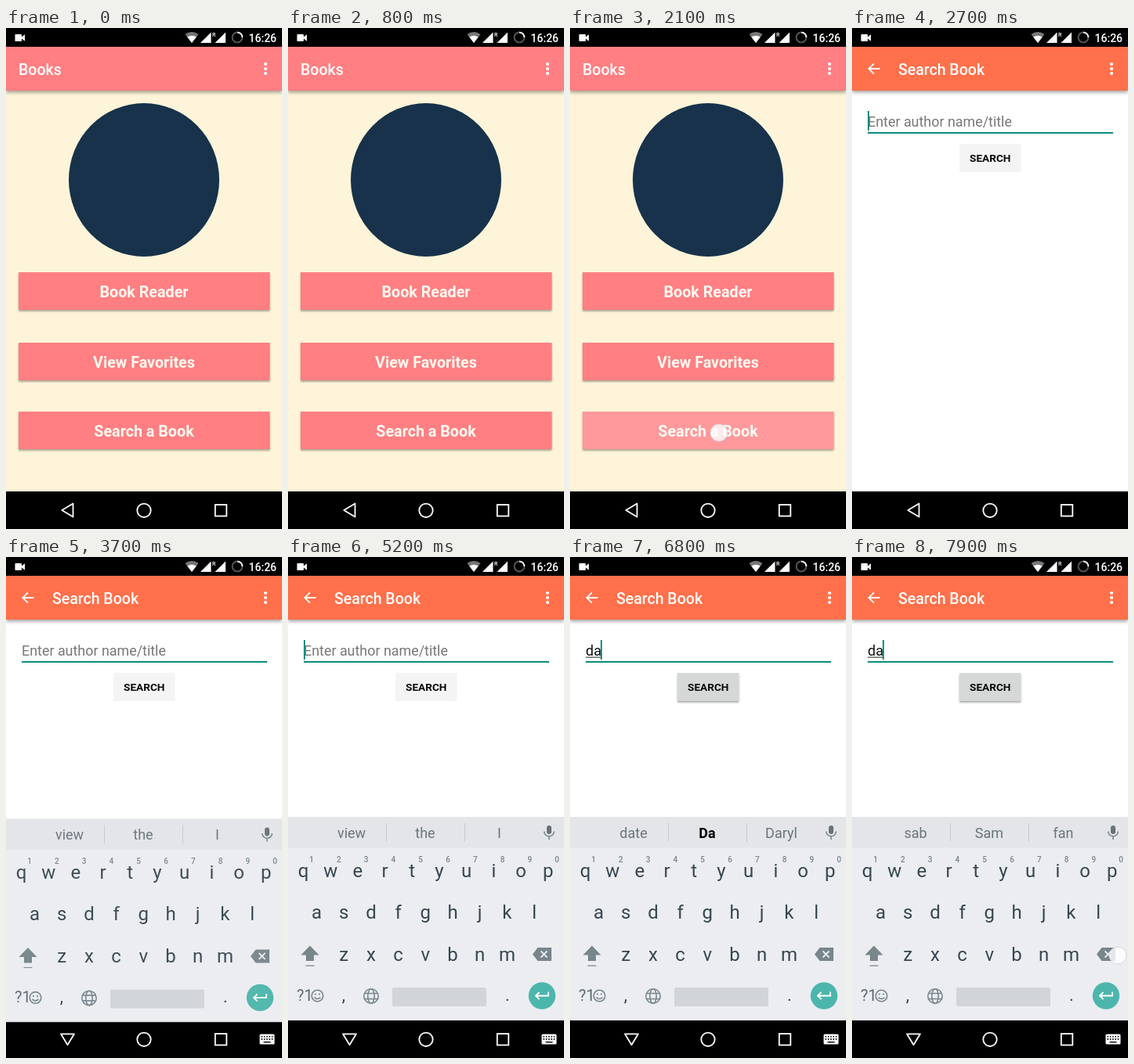
An HTML page for the animation above (8000 ms loop, 352x640 px).

```html
<!DOCTYPE html>
<html lang="en">
<head>
<meta charset="utf-8">
<title>Book search</title>
<style>
html, body { margin: 0; width: 352px; height: 640px; overflow: hidden; background: #000; }
svg { display: block; font-family: Roboto, sans-serif; }
.mid { text-anchor: middle; }
.med { font-weight: 500; }
.bold { font-weight: 700; }
.line { fill: none; stroke: #fff; stroke-width: 1.8; }
.key { font-size: 24px; fill: #37474f; text-anchor: middle; }
.digit { font-size: 10px; font-weight: 500; fill: #78868c; text-anchor: middle; }
.word { font-size: 18px; fill: #6a757b; text-anchor: middle; }
.word.bold { fill: #000; }
.glyph { fill: none; stroke: #78868c; stroke-width: 1.6; }
</style>
</head>
<body>
<svg id="stage" width="352" height="640" viewBox="0 0 352 640"></svg>
<script>
const stage = document.getElementById('stage');

const text = (x, y, size, fill, str, cls = '', extra = '') =>
  `<text x="${x}" y="${y}" font-size="${size}" fill="${fill}" class="${cls}" ${extra}>${str}</text>`;
const rect = (x, y, w, h, fill, extra = '') =>
  `<rect x="${x}" y="${y}" width="${w}" height="${h}" fill="${fill}" ${extra}/>`;
const path = (d, extra) => `<path d="${d}" ${extra}/>`;
const circle = (x, y, r, extra) => `<circle cx="${x}" cy="${y}" r="${r}" ${extra}/>`;

const toolbar = (color, title, x) =>
  rect(0, 24, 352, 56, color, 'filter="url(#barShadow)"') +
  text(x, 60, 19.5, '#fff', title, 'med') +
  [46, 52, 58].map(y => circle(331, y, 2.1, 'fill="#fff"')).join('');

const bigButton = (y, label) =>
  rect(16, y, 320.5, 48, '#ff7f82', 'filter="url(#shadow)"') +
  text(176, y + 32, 19.7, '#fffaf0', label, 'mid bold');

const keyRow = (letters, x, y) =>
  [...letters].map((c, i) => `<text class="key" x="${x + i * 34.7}" y="${y}">${c}</text>`).join('');

const books =
  rect(0, 24, 352, 568, '#fdf4d9') +
  toolbar('#ff7f82', 'Books', 16) +
  '<ellipse cx="176" cy="194" rx="96" ry="98" fill="#17324a"/>' +
  bigButton(312, 'Book Reader') + bigButton(402, 'View Favorites') + bigButton(490, 'Search a Book') +
  rect(16, 490, 320.5, 48, '#fff', 'id="press" opacity="0"');

const search =
  rect(0, 24, 352, 568, '#fff') +
  toolbar('#ff6f4b', 'Search Book', 59) +
  path('M35.5 52H21.5M28 45.3L21.3 52L28 58.7', 'class="line"') +
  text(20, 126, 17.9, '#777', 'Enter author name/title', '', 'id="hint"') +
  text(20, 126, 18, '#111', '', '', 'id="typed"') +
  rect(20, 127.6, 0, 1, '#222', 'id="under"') +
  rect(20, 133, 313, 2, '#0d8c80') +
  rect(20, 106, 2, 25, '#0d8c80', 'id="cursor"') +
  rect(137, 148, 78.5, 36, '#f4f4f4', 'id="button" rx="1"') +
  text(176.3, 171, 13.6, '#0a0a0a', 'SEARCH', 'mid bold');

const keyboard =
  rect(0, 332, 352, 40, '#e3e5e9') + rect(0, 371.5, 352, 220.5, '#ebedf1') + rect(0, 592, 352, 60, '#000') +
  [81, 175, 269.5].map(x => `<text class="word" x="${x}" y="359"></text>`).join('') +
  rect(125, 340, 1, 24, '#c6cacd') + rect(225, 340, 1, 24, '#c6cacd') +
  rect(330, 343, 6, 11, '#687278', 'rx="3"') +
  path('M326.7 350.5a6.3 6.3 0 0 0 12.6 0M333 357v4', 'class="glyph"') +
  [...'1234567890'].map((c, i) => `<text class="digit" x="${30 + i * 34.8}" y="390">${c}</text>`).join('') +
  keyRow('qwertyuiop', 19.5, 409) + keyRow('asdfghjkl', 36.5, 462) + keyRow('zxcvbnm', 71.2, 516) +
  path('M28 496.5L39.5 508.5H33V516H23V508.5H16.5ZM22.5 521.5h11v1.2h-11Z', 'fill="#78868c"') +
  path('M312 507.5L318.5 499H336V516H318.5Z', 'fill="#78868c"') +
  path('M322.5 503.5l8 8m0-8l-8 8', 'stroke="#ebedf1" stroke-width="1.8"') +
  text(11, 567, 20, '#5d6b72', '?1') +
  circle(37.5, 560.5, 7.3, 'class="glyph"') +
  circle(35, 558.5, 1.1, 'fill="#78868c"') + circle(40, 558.5, 1.1, 'fill="#78868c"') +
  path('M33.5 562.5q4 4 8 0', 'class="glyph"') +
  text(71, 567, 22, '#37474f', ',', 'mid') + text(280, 567, 22, '#37474f', '.', 'mid') +
  circle(106, 561, 9.2, 'class="glyph"') +
  '<ellipse cx="106" cy="561" rx="4.2" ry="9.2" class="glyph"/>' +
  path('M98 557.5h16M98 564.5h16', 'class="glyph"') +
  rect(133, 550, 120, 24, '#d1d4d8', 'rx="2"') +
  circle(324, 560.5, 17.2, 'fill="#4db6ac"') +
  path('M332 555.5V560.5H316M320.5 556L316 560.5L320.5 565', 'class="line"');

const status =
  rect(0, 0, 352, 24, '#000') +
  rect(11.5, 8, 8.5, 9, '#fff', 'rx="1"') + path('M20 11.5L24 8.3V16.7L20 13.5Z', 'fill="#fff"') +
  path('M228.5 8Q237 1.8 245.5 8L237 19Z', 'fill="#777"') +
  path('M231.2 11.5Q237 8 242.8 11.5L237 19Z', 'fill="#fff"') +
  path('M248 19L261.5 5.5V19ZM266.5 19L280 5.5V19Z', 'fill="#fff"') +
  text(263, 11, 7, '#fff', 'R', 'med') +
  circle(295, 12, 6.4, 'fill="none" stroke="#555" stroke-width="2"') +
  path('M295 5.6A6.4 6.4 0 0 1 301.4 12', 'class="line"') +
  text(309.5, 17.5, 14, '#fff', '16:26', 'med');

const navIcons =
  path('', 'id="back" class="line" stroke-linejoin="round"') +
  circle(176, 616.3, 8.7, 'class="line"') +
  '<rect x="266.8" y="609" width="14.5" height="14.5" class="line"/>' +
  '<g id="imeIcon">' + rect(323.5, 609.5, 19, 13, '#fff', 'rx="1.5"') +
  path('M325.5 612.7h15M325.5 615.9h15', 'stroke="#000" stroke-width="1.6" stroke-dasharray="1.6 1.7"') +
  path('M328.5 619.7h9', 'stroke="#000" stroke-width="1.4"') + '</g>';

stage.innerHTML = `<defs>
  <filter id="shadow" x="-5%" y="-20%" width="110%" height="150%">
    <feDropShadow dx="0" dy="2" stdDeviation=".8" flood-opacity=".32"/></filter>
  <filter id="barShadow" x="-5%" y="-20%" width="110%" height="150%">
    <feDropShadow dx="0" dy="2.5" stdDeviation="2" flood-opacity=".35"/></filter>
  </defs>${books}<g id="search">${search}</g>${rect(0, 592, 352, 48, '#000')}
  <g id="keyboard">${keyboard}</g>${navIcons}${status}
  <circle id="touch" r="11" fill="#fff" fill-opacity=".8" stroke="#c9d0d8" stroke-width=".8"/>`;

const el = id => document.getElementById(id);
const set = (node, attrs) => Object.entries(attrs).forEach(([k, v]) => node.setAttribute(k, v));
const words = [...stage.querySelectorAll('.word')];

const LOOP = 8000, STEP = 100;
const OPEN = 2300, IME = 3500;
// start, typed text, suggestions
const typing = [
  [0, '', ['view', 'the', 'I']],
  [5600, 'd', ['did', 'D', 'day']],
  [6400, 'da', ['date', 'Da', 'Daryl']],
  [7200, 'dab', ['sab', 'Sam', 'fan']],
  [7800, 'da', ['sab', 'Sam', 'fan']],
];
// start, end, x, y
const touches = [
  [2000, 2200, 190, 517], [5500, 5700, 106, 456], [6300, 6500, 37, 456],
  [7100, 7300, 210, 510], [7800, 8000, 339, 509],
];
const cursorOff = [[2900, 3300], [3700, 3800], [4300, 5200], [6100, 6400], [6900, 7200]];

const within = t => ([a, b]) => t >= a && t < b;
const progress = (t, start, span) => Math.min(1, Math.max(0, (t - start) / span));
const easeOut = (p, power) => 1 - (1 - p) ** power;

function render(t) {
  const slide = progress(t, OPEN, 350);
  set(el('search'), {
    transform: `translate(0 ${45 * (1 - easeOut(slide, 5))})`,
    opacity: easeOut(progress(t, OPEN, 200), 4),
  });
  set(el('press'), { opacity: t >= 2000 && t < OPEN ? 0.2 : 0 });

  const rise = progress(t, IME, 500);
  set(el('keyboard'), {
    transform: `translate(0 ${31 * (1 - easeOut(rise, 5))})`,
    opacity: easeOut(progress(t, IME, 300), 3),
  });
  const open = t >= IME;
  set(el('back'), { d: open ? 'M70 609.3H87L78.5 623.3Z' : 'M71.3 616L85.5 607.5V624.5Z' });
  set(el('imeIcon'), { opacity: +open });

  const [, value, tips] = typing.findLast(s => s[0] <= t);
  el('typed').textContent = value;
  const width = value ? el('typed').getComputedTextLength() : 0;
  set(el('hint'), { opacity: +!value });
  set(el('under'), { width });
  set(el('cursor'), { x: 20 + Math.max(0, width - 1), opacity: +!cursorOff.some(within(t)) });
  set(el('button'), { fill: value ? '#d6d7d7' : '#f4f4f4', filter: value ? 'url(#shadow)' : 'none' });
  words.forEach((w, i) => {
    w.textContent = tips[i];
    w.classList.toggle('bold', i === 1 && tips[1].toLowerCase() === value);
  });

  const tap = touches.find(within(t));
  set(el('touch'), tap ? { cx: tap[2], cy: tap[3], opacity: 1 } : { opacity: 0 });
}

const begin = performance.now();
function tick() {
  const t = (performance.now() - begin) % LOOP;
  render(Math.floor(t / STEP) * STEP);
  requestAnimationFrame(tick);
}
tick();
</script>
</body>
</html>
```
